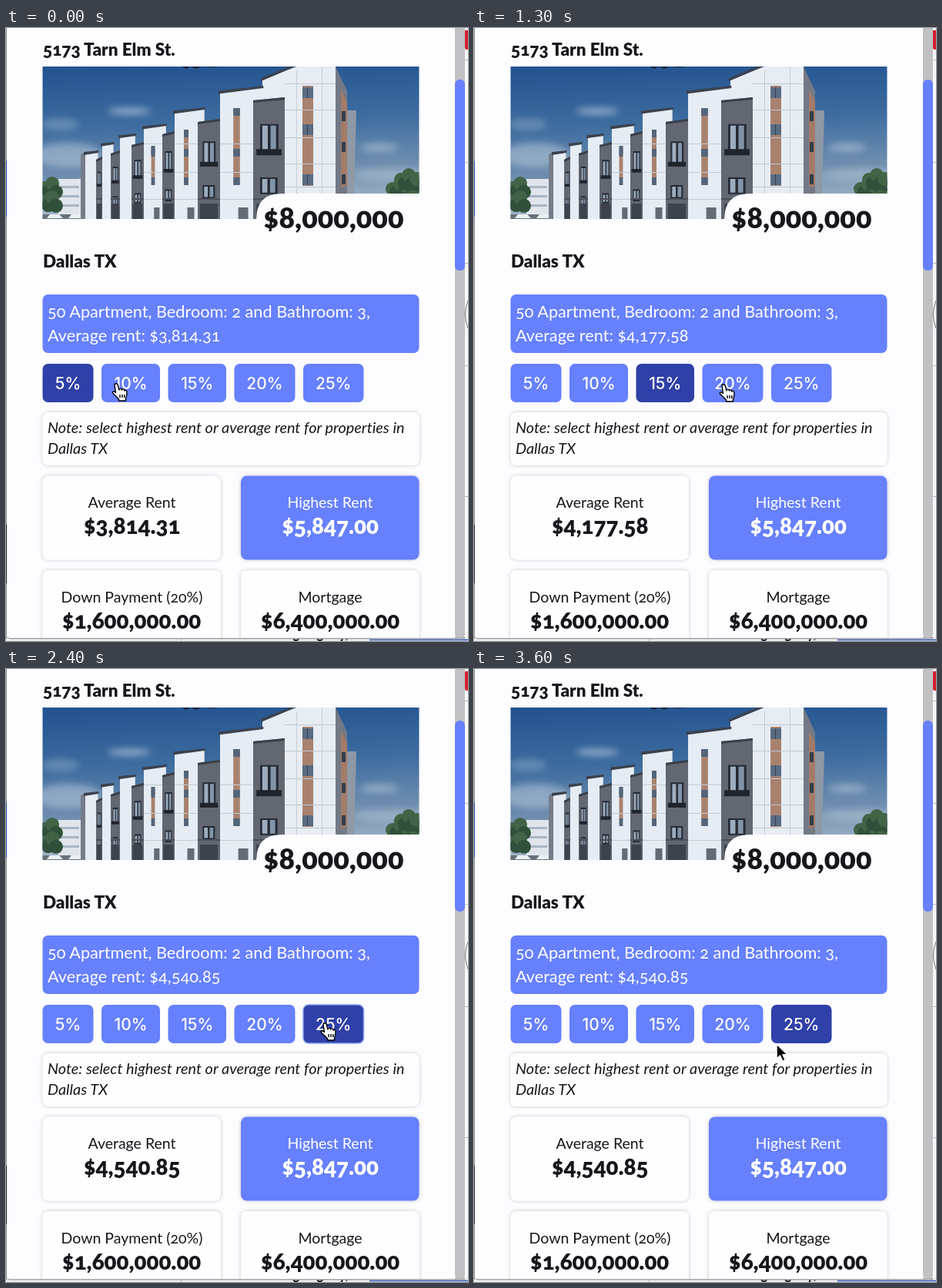
An HTML page that plays this animation: 600x796 px, repeating every 3.7 s.

```html
<!DOCTYPE html>
<html lang="en">
<head>
<meta charset="utf-8">
<title>Property card</title>
<style>
  html, body { margin: 0; width: 100%; height: 100%; overflow: hidden; background: #fdfcff; }
  svg { display: block; width: 600px; height: 796px; }
  text {
    font-family: Lato, "Open Sans", sans-serif; font-size: 19.5px; fill: #17171b;
    font-variant: no-common-ligatures oldstyle-nums;
  }
  .black { font-weight: 900; }
  .mid { text-anchor: middle; }
  .light { fill: #fff; }
  .blue { fill: #6680fe; }
  .card { fill: #fefdff; filter: url(#soft); }
  .title { font-size: 22.5px; }
  .info { font-size: 21.7px; }
  .sum text { font-size: 29.5px; }
  #buttons text { font: 500 21px Inter, sans-serif; }
</style>
</head>
<body>
<svg viewBox="0 0 600 796">
  <defs>
    <filter id="soft" x="-10%" y="-20%" width="120%" height="140%">
      <feDropShadow dx="0" dy="0" stdDeviation="2.5" flood-color="#000" flood-opacity=".22"/>
    </filter>
    <filter id="blur" x="-50%" y="-200%" width="200%" height="500%"><feGaussianBlur stdDeviation="5"/></filter>
    <linearGradient id="sky" x2=".1" y2="1">
      <stop stop-color="#22528f"/><stop offset=".4" stop-color="#3d6c9f"/>
      <stop offset=".75" stop-color="#7391b0"/><stop offset="1" stop-color="#a5b9cb"/>
    </linearGradient>
    <clipPath id="frame"><path d="M47.5 50H536.5V215H358Q325 215 325 248H47.5Z"/></clipPath>
  </defs>

  <!-- page behind the panel -->
  <path fill="#ececef" d="M0 0H600V796H0Z"/>
  <path fill="#f8f8fa" d="M596 0H600V790H596Z"/>
  <path fill="#d3202f" d="M596 3H600V28H598Q596 28 596 25Z"/>
  <path stroke="#b9b9bd" d="M596 41.5H600M596 174.5H600M596 305.5H600M596 438.5H600M596 608.5H600M227.5 792V796"/>
  <path fill="none" stroke="#777" d="M600 354Q593 372 600 390"/>
  <text class="black" x="354" y="793" style="font-size:16px">ongoing key,</text>
  <path stroke="#3157b5" stroke-width="1.5" d="M472 794.5H600"/>
  <path fill="#8f9096" d="M0 0H1V793H0Z"/>
  <path fill="#1f4fae" d="M0 173H1V245H0Z"/>
  <path fill="#22242c" d="M0 645H1V721H0Z"/>
  <path fill="#a5a5aa" d="M1 791H596V793.5H6Q1 793 1 790Z"/>

  <path fill="#fdfcff" d="M1 0H583V792H5Q1 792 1 788Z"/>
  <text class="black title" x="48" y="36">5173 Tarn Elm St.</text>
  <g id="photo" clip-path="url(#frame)"></g>
  <text class="black" x="334" y="260" style="font-size:38px">$8,000,000</text>
  <text class="black title" x="48" y="311">Dallas TX</text>

  <rect class="blue" x="47.5" y="346" width="489" height="76" rx="7"/>
  <text class="light info" x="54" y="376">50 Apartment, Bedroom: 2 and Bathroom: 3,</text>
  <text class="light info" id="summary" x="54" y="407"></text>
  <g id="buttons"></g>

  <rect class="card" x="47.5" y="499" width="489" height="69" rx="8"/>
  <g font-style="italic">
    <text x="54" y="526" style="font-size:19.9px">Note: select highest rent or average rent for properties in</text>
    <text x="54" y="553" style="font-size:19.9px">Dallas TX</text>
  </g>

  <svg width="583" height="792">
    <rect class="card" x="47.5" y="581.5" width="231.5" height="109" rx="8"/>
    <rect class="card" x="305" y="581.5" width="231.5" height="109" rx="8" style="fill:#6680fe"/>
    <rect class="card" x="47.5" y="704" width="231.5" height="109" rx="8"/>
    <rect class="card" x="305" y="704" width="231.5" height="109" rx="8"/>
    <g class="mid">
      <text x="163.5" y="623">Average Rent</text>
      <text class="light" x="421" y="623">Highest Rent</text>
      <text x="163.5" y="746">Down Payment (20%)</text>
      <text x="421" y="746">Mortgage</text>
      <g class="black sum">
        <text id="rent" x="163.5" y="657"></text>
        <text class="light" x="421" y="657">$5,847.00</text>
        <text x="163" y="780">$1,600,000.00</text>
        <text x="421" y="780">$6,400,000.00</text>
      </g>
    </g>
  </svg>

  <path fill="#c1c1c3" d="M583 0H596V786Q596 792 590 792H589Q583 792 583 786Z"/>
  <rect class="blue" x="583" y="67" width="13" height="248" rx="6"/>

  <g id="cursor" stroke-linejoin="round">
    <path id="arrow" fill="#000" stroke="#fff" stroke-width="1.5" d="M0 0V19L4.5 15L7.8 22.3L11.2 20.8L8 13.8H14Z"/>
    <path id="hand" fill="#fff" stroke="#000" stroke-width="1.4"
      d="M-2 2C-2-1 1.5-1 2.2 1.5L4 8C4 5.5 7 5.5 7.5 8C8 6.3 10.5 6.5 11 9C12 7.5 14 8.5 14 11C14.2 15 13.5 17 12.5 19V22H3.5V20C1 17-2 14.5-4.5 12C-5.5 10 -3 9-.5 11.5ZM5 14V18M8 14V18M10.8 14V18"/>
  </g>
</svg>

<script>
const $ = id => document.getElementById(id);
const shape = (fill, d) => `<path fill="${fill}" d="${d}"/>`;
const box = (fill, x, y, w, h) => shape(fill, `M${x} ${y}h${w}v${h}h${-w}Z`);

function cloud(x, y, rx, ry, opacity) {
  return `<ellipse cx="${x}" cy="${y}" rx="${rx}" ry="${ry}" fill="#dce5ed" opacity="${opacity}" filter="url(#blur)"/>`;
}

function windowPane(x, y, w, h) {
  return box('#252a35', x, y, w, h) + box('#9dadbd', x + w * .12, y + 2, w * .3, h - 4)
    + box('#8294a8', x + w * .57, y + 2, w * .3, h - 4);
}

// White wall whose top storey reaches over the bays on both sides.
function wall([x, mid, end, top]) {
  const w = mid - x, right = mid + (end - mid) * .3, rise = w * .15;
  let s = shape('#e6ecf3', `M${x} ${top + rise}L${right} ${top}V248H${x}Z`)
    + shape('#3b424e', `M${x - 2} ${top + rise - 2}L${right + 1} ${top - 2}v3L${x - 2} ${top + rise + 2}Z`);
  if (w > 20) {
    const bx = x + w * .4, bw = w * .2;
    s += box('#a9826e', bx, top + 27, bw, 168 - top);
    for (const y of [top + 27, 157, 194]) s += box('#53657b', bx, y, bw, 10);
    for (const y of [150, 187, 222]) s += box('#c3cad3', x, y, w, 1);
    s += box('#656b76', x + w * .55, 233, w * .3, 15);
  }
  return s;
}

// Grey bay with balcony, small window and garage.
function bay([, x, end, , top]) {
  const w = end - x, h = 248 - top;
  return shape('#626772', `M${x} ${top}L${end} ${top - 4}V248H${x}Z`)
    + shape('#3a3f49', `M${x} ${top}L${end} ${top - 4}v3L${x} ${top + 3}Z`)
    + windowPane(x + w * .22, top + h * .2, w * .58, h * .25)
    + box('#20242c', x + w * .1, top + h * .41, w * .8, 2 + w * .15)
    + windowPane(x + w * .22, top + h * .65, w * .55, h * .14)
    + box('#4a4e58', x, 221, w, 2) + box('#3d424c', x + w * .1, 228, w * .8, 20);
}

function tower() {
  let s = shape('#e8edf3', 'M333 68L362 56L392 44H428V248H333Z')
    + shape('#3b424e', 'M331 69L366 54L376 50H368L331 65Z')
    + shape('#737985', 'M428 50L443 82V220H428Z')
    + shape('#a37c69', 'M435 80L443 96V205L435 207Z')
    + shape('#8f98a5', 'M443 107H455L452 220H443Z')
    + box('#a9826e', 385, 75, 14, 130);
  for (const y of [77, 125, 190]) s += box('#596c83', 385, y, 14, 14) + box('#354151', 391, y, 1, 14);
  for (const y of [108, 148, 190]) s += box('#343d4b', 436, y, 5, 13);
  for (const y of [72, 106, 142, 176, 206]) s += box('#bfc8d2', 362, y, 66, 1);
  return s + box('#c5ced7', 377, 55, 1, 170) + box('#c5ced7', 410, 50, 1, 170);
}

function tree(x, y, n, step) {
  let s = '';
  for (let i = 0; i < n; i++)
    s += `<circle cx="${x + i * step}" cy="${y + 6 * Math.sin(i * 2.4)}" r="9" fill="${i % 2 ? '#31503b' : '#426345'}"/>`;
  return s;
}

function drawPhoto() {
  const houses = [
    [103, 117, 125, 161, 171], [125, 136, 148, 150, 163], [148, 163, 179, 139, 152],
    [179, 203, 219, 126, 138], [219, 249, 278, 105, 122], [278, 321, 362, 77, 94]
  ];
  $('photo').innerHTML = box('url(#sky)', 47, 50, 490, 198)
    + cloud(80, 165, 45, 16, .4) + cloud(160, 108, 28, 4, .6) + cloud(70, 125, 25, 8, .25)
    + cloud(485, 155, 25, 5, .45) + cloud(500, 190, 50, 8, .3)
    + shape('#18263d', 'M228 50L234 53L240 50L247 53L254 50L266 51L278 50Z')
    + box('#dfe5eb', 68, 196, 30, 48)
    + [205, 217, 229].map(y => box('#a9b6c3', 71, y, 24, 3)).join('')
    + tree(50, 208, 4, 5) + tree(50, 226, 4, 5)
    + box('#67717a', 47, 242, 58, 6)
    + [53, 81].map(x => shape('#edf0f3', `M${x} 247l4-5h12l5 5Z`)).join('')
    + shape('#777d88', 'M97 164L103 161V248H97Z')
    + tower() + houses.map(wall).join('') + houses.map(bay).join('')
    + tree(502, 209, 8, 5) + tree(513, 197, 5, 5);
}

const buttons = [[47.5, 66], [124, 76], [210.5, 75.5], [296.5, 79], [386, 78.5]];
const clicks = [-1000, 300, 900, 1400, 2200];
// Cursor stops: time, x, y.
const path = [
  [0, 143, 462], [350, 143, 462], [500, 210, 464], [700, 235, 463], [1050, 235, 463],
  [1300, 324, 463], [1600, 324, 463], [1800, 381, 457], [2100, 414, 460],
  [3000, 414, 460], [3400, 393, 487], [3700, 393, 487]
];

$('buttons').innerHTML = buttons.map(([x, w], i) =>
  `<rect x="${x}" y="436" width="${w}" height="50" rx="7" stroke-width="1.5"/>
   <text class="mid light" x="${x + w / 2}" y="469">${5 * i + 5}%</text>`).join('');
const rects = [...$('buttons').querySelectorAll('rect')];

function pointer(t) {
  const i = path.findIndex(p => p[0] > t);
  const [t0, x0, y0] = path[i - 1], [t1, x1, y1] = path[i];
  const k = (t - t0) / (t1 - t0);
  return [x0 + (x1 - x0) * k, y0 + (y1 - y0) * k];
}

function draw(time) {
  const t = Math.floor(time % 3700 / 100) * 100;
  const chosen = clicks.filter(c => t >= c + 100).length - 1;
  rects.forEach((r, i) => {
    const age = t - clicks[i];
    r.setAttribute('fill', i === chosen ? '#2f40a8' : '#6680fe');
    r.setAttribute('stroke', age >= 0 && age < 300 ? '#86a2f0' : 'none');
  });

  const rent = '$' + (3632.68 * (1.05 + chosen * .05)).toLocaleString('en-US',
    { minimumFractionDigits: 2, maximumFractionDigits: 2 });
  $('rent').textContent = rent;
  $('summary').textContent = 'Average rent: ' + rent;

  const [x, y] = pointer(t);
  const over = y < 486 && buttons.some(([left, w]) => x >= left && x <= left + w);
  $('cursor').setAttribute('transform', `translate(${x} ${y})`);
  $('hand').style.display = over ? '' : 'none';
  $('arrow').style.display = over ? 'none' : '';
}

const start = performance.now();
function tick(now) {
  draw(Math.max(0, now - start));
  requestAnimationFrame(tick);
}

drawPhoto();
draw(0);
requestAnimationFrame(tick);
</script>
</body>
</html>
```
